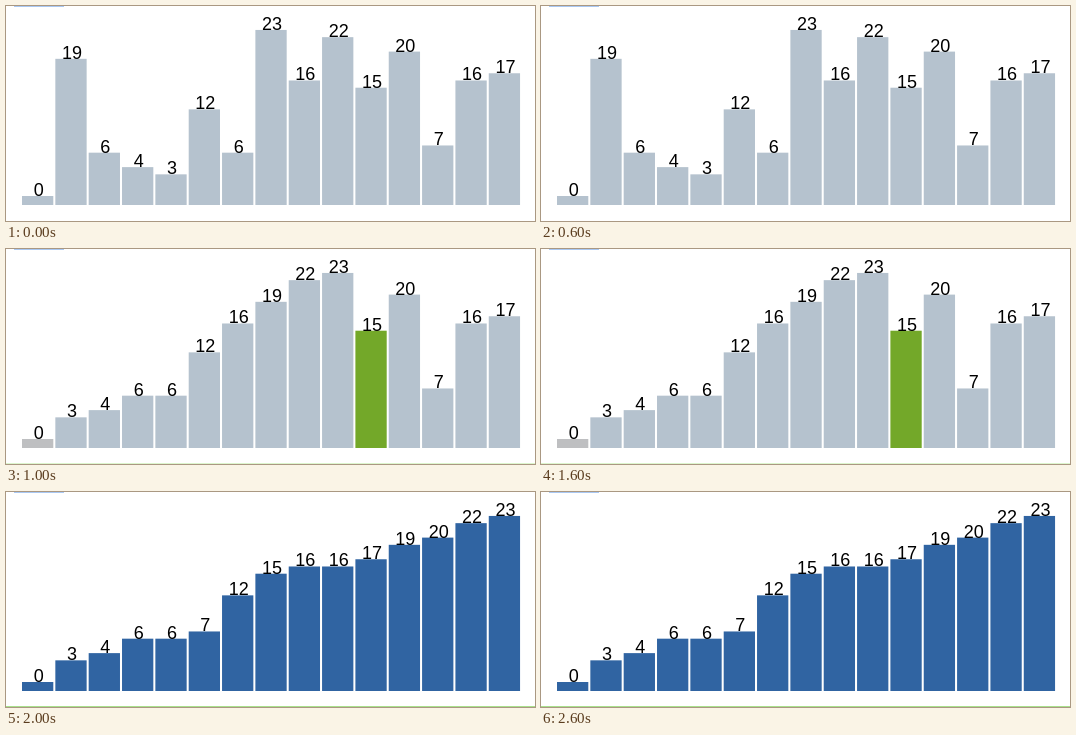
Recreate the animation shown at these times as an HTML page. Size 529 by 215 pixels, loop 3 s.

```html
<!DOCTYPE html>
<html lang="en">
<head>
<meta charset="utf-8">
<title>Sorting bars</title>
<style>
  html, body { margin: 0; width: 100%; height: 100%; overflow: hidden; background: #fff; }
  svg { display: block; }
  text { font: 18px "Liberation Sans", Arial, sans-serif; text-anchor: middle; fill: #000; }
  .stage { visibility: hidden; animation: show 3s step-end infinite; }
  .stage:nth-of-type(2) { animation-delay: -2s; }
  .stage:nth-of-type(3) { animation-delay: -1s; }
  @keyframes show {
    0% { visibility: visible; }
    33.3333%, 100% { visibility: hidden; }
  }
</style>
</head>
<body>
<svg id="chart" width="529" height="215" viewBox="0 0 529 215">
  <rect x="8" width="50" height="1" fill="#a9c8f3"/>
</svg>
<script>
  const chart = document.getElementById('chart');
  const BASE = 199, PITCH = 33.34, WIDTH = 31.3;
  const IDLE = '#b5c2ce', ACTIVE = '#73a829', DONE = '#3064a2';

  function add(parent, tag, attrs, text = '') {
    const el = document.createElementNS('http://www.w3.org/2000/svg', tag);
    for (const key in attrs) el.setAttribute(key, attrs[key]);
    el.textContent = text;
    return parent.appendChild(el);
  }

  function addStage(values, color, rule) {
    const g = add(chart, 'g', { class: 'stage' });
    values.forEach((v, i) => {
      const x = 16 + i * PITCH, h = 9 + v * 7.22;
      add(g, 'rect', { x, y: BASE - h, width: WIDTH, height: h, fill: color(i) });
      add(g, 'text', { x: x + WIDTH / 2 + 1, y: BASE - h }, v);
    });
    if (rule) add(g, 'rect', { y: 214, width: 529, height: 1, fill: rule });
  }

  const start = [0, 19, 6, 4, 3, 12, 6, 23, 16, 22, 15, 20, 7, 16, 17];
  const sorted = n => [...start.slice(0, n).sort((a, b) => a - b), ...start.slice(n)];

  addStage(start, () => IDLE);
  addStage(sorted(10), i => i === 10 ? ACTIVE : i ? IDLE : '#bebfc1', '#dcf5cd');
  addStage(sorted(15), () => DONE, '#a9e08c');
</script>
</body>
</html>
```
